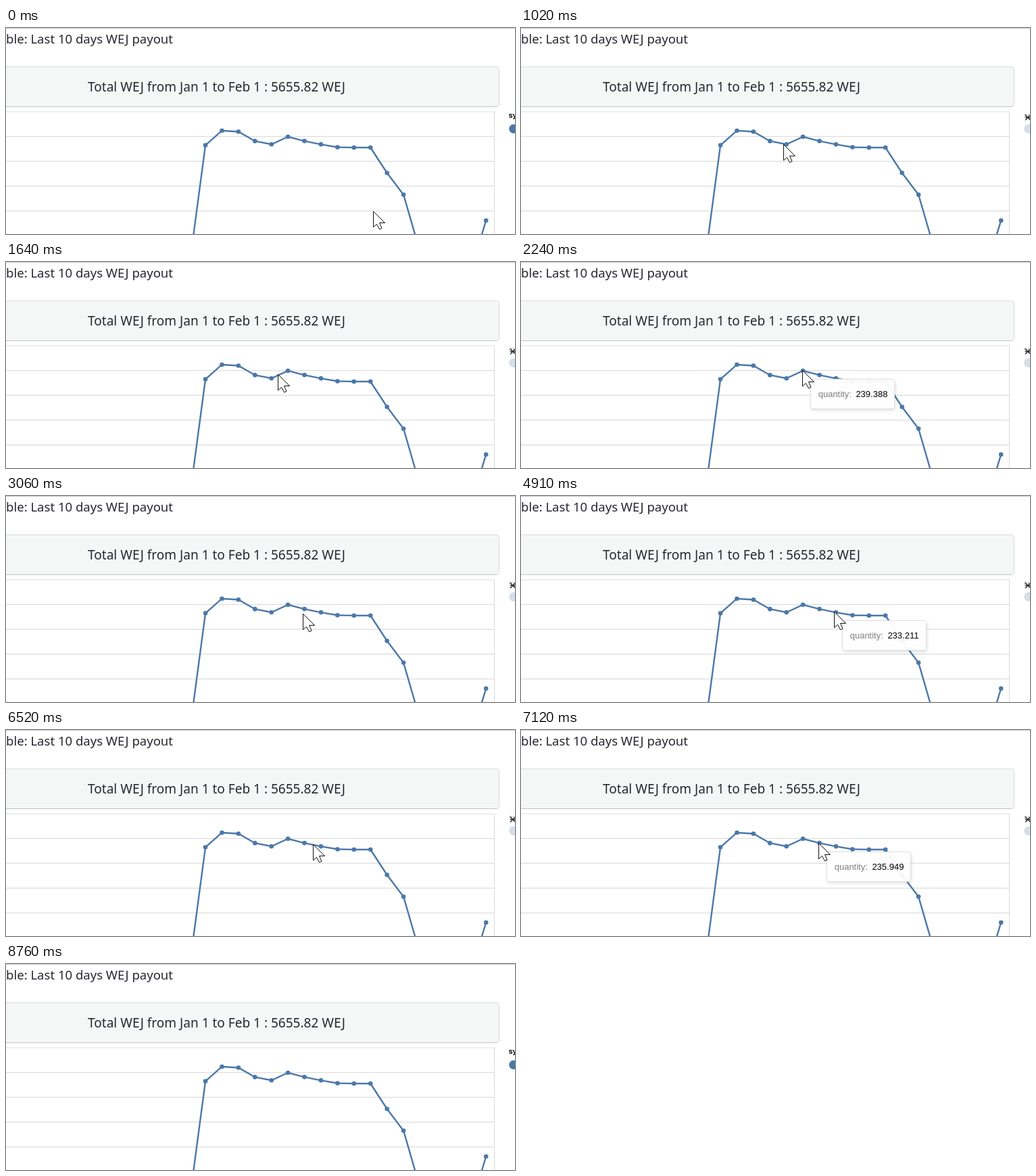
Write an HTML page that moves like this. It is 753 by 305 pixels and loops after 8980 ms.

```html
<!DOCTYPE html>
<html lang="en">
<head>
<meta charset="utf-8">
<style>
  html, body { margin: 0; width: 100%; height: 100%; overflow: hidden; background: #fff; }
  svg { display: block; width: 753px; height: 305px; }
  .copy { font-family: "Noto Sans", sans-serif; fill: #262730; }
  .small { font-family: "Liberation Sans", Arial, sans-serif; font-size: 13px; }
  #tipBox { filter: drop-shadow(1px 2px 2px rgba(0, 0, 0, .12)); }
</style>
</head>
<body>
<svg viewBox="0 0 753 305">
  <path d="M0 .5H753" stroke="#c9c9c9"/>
  <text class="copy" x="0" y="23" font-size="18.55">ble: Last 10 days WEJ payout</text>
  <rect x="-9" y="57.5" width="738.5" height="59" rx="4" fill="#f5f7f7" stroke="#d8dcde"/>
  <path d="M0 116.5H726" stroke="#bfc2c4"/>
  <text class="copy" x="311.5" y="94" font-size="19.05" text-anchor="middle">Total WEJ from Jan 1 to Feb 1 : 5655.82 WEJ</text>

  <g id="chart" fill="#4c78a8"></g>

  <text class="small" x="743.5" y="133" style="font-size:11px" font-weight="bold">symbol</text>
  <circle cx="751" cy="149.3" r="6.8" fill="#4c78a8"/>
  <g id="button">
    <rect x="743" y="126" width="10" height="32" fill="#fff" opacity=".76"/>
    <path d="M746 128.5l7 7.500M753 129l-7 7.500M746 132.500h7" stroke="#333" stroke-width="1.500"/>
  </g>

  <g id="tip">
    <rect id="tipBox" x=".5" y=".5" width="124" height="44" rx="3" fill="#fff" fill-opacity=".95" stroke="#dedede"/>
    <text class="small" x="11.7" y="27" fill="#808080">quantity:</text>
    <text class="small" x="67.4" y="27" id="value"></text>
  </g>
  <path id="cursor" d="M.5 .5V24L5.500 19.500L9.500 27L13 25.500L9.500 17.500H17.500Z" fill="#fff" stroke="#111"/>
</svg>
<script>
const $ = id => document.getElementById(id);
const LOOP = 8980, TICK = 205, HOVER = 5;

const quantities = [132.9, 232.6, 244.3, 243.5, 235.9, 233.286, 239.388, 235.949, 233.211,
  231, 230.7, 230.7, 210.3, 192.8, 147, 110, 110, 128.5, 172];
const points = quantities.map((q, i) => ({ q, x: 270.6 + i * 24.42, y: 161 + (239.388 - q) * 1.84 }));

const grid = [0, 1, 2, 3, 4].map(i => `M0 ${124 + i * 36.7}H722.5`).join('');
$('chart').innerHTML =
  `<path d="${grid}M0 124H722.5V305" fill="none" stroke="#ddd" stroke-width="1.2"/>` +
  `<polyline points="${points.map(p => [p.x, p.y]).join(' ')}" fill="none" stroke="#4c78a8" stroke-width="2.4"/>` +
  points.map(p => `<circle cx="${p.x}" cy="${p.y}" r="3.3"/>`).join('');

// Each move: first and last step time, then where the cursor arrives
const start = [543, 271];
const moves = [
  [200, 1020, 388, 172],
  [1240, 2240, 416, 160],
  [2660, 3060, 439, 174],
  [3460, 3660, 442, 169],
  [4290, 4910, 463, 171],
  [6320, 7120, 440, 167],
  [8130, 8760, 520, 340]
];

// The cursor advances in equal jumps, one per tick
function cursorAt(t) {
  let [x, y] = start;
  for (const [from, to, endX, endY] of moves) {
    if (t < from) break;
    const jumps = Math.round((to - from) / TICK);
    const done = Math.min(jumps, Math.floor((t - from) / (to - from) * jumps));
    const p = (done + 1) / (jumps + 1);
    x += (endX - x) * p;
    y += (endY - y) * p;
  }
  return [Math.round(x), Math.round(y)];
}

function place(id, x, y) {
  $(id).setAttribute('transform', `translate(${x} ${y})`);
}

function show(id, visible) {
  $(id).style.display = visible ? '' : 'none';
}

function draw() {
  const t = performance.now() % LOOP;
  const [x, y] = cursorAt(t);
  const hit = points.find(p => Math.hypot(p.x - x, p.y - y) < HOVER);
  place('cursor', x, y);
  place('tip', x + 12, y + 13);
  show('tip', hit && t >= moves[1][0]);
  $('value').textContent = hit ? hit.q.toFixed(3) : '';
  show('button', t >= moves[0][0] && y < 305);
  requestAnimationFrame(draw);
}
draw();
</script>
</body>
</html>
```
